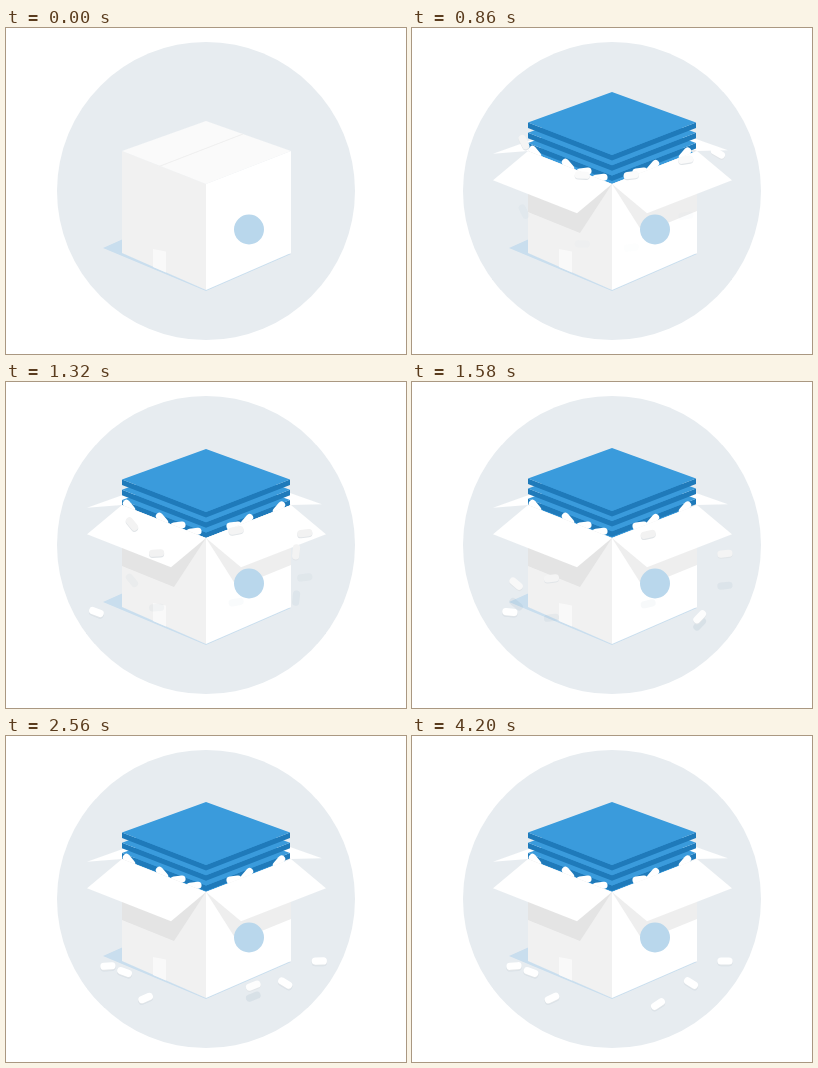
An HTML page that plays this animation: 400 px wide and 326 px high, repeating every 5400 ms.

```html
<!DOCTYPE html>
<html lang="en">
<head>
<meta charset="utf-8">
<title>Unboxing</title>
<style>
html, body { margin: 0; width: 100%; height: 100%; overflow: hidden; background: #fff; }
svg { display: block; width: 100vw; height: 100vh; }
.foam line { stroke-width: 7.2; stroke-linecap: round; }
</style>
</head>
<body>
<svg viewBox="0 0 400 326">
  <circle cx="200" cy="163" r="149" fill="#e7ecf0"/>
  <path d="M97 220 116 211.5 285 226 200 263Z" fill="#c9deee"/>
  <g id="back"></g>
  <path id="inside" d="M116 123 200 93 285 123 200 156Z" fill="#e9e9e9"/>
  <g id="sheets"></g>
  <g id="rim" class="foam"></g>
  <path d="M116 123 200 156V262L116 225Z" fill="#f1f1f1"/>
  <path d="M200 156 285 123V225L200 262Z" fill="#fff"/>
  <path d="M147 221 160 223.5V244.5L147 239Z" fill="#f9f9f9"/>
  <path id="shadeL" fill="#e4e4e4"/>
  <path id="shadeR" fill="#eee"/>
  <circle cx="243" cy="201.5" r="15" fill="#b9d7ec"/>
  <g id="lid">
    <path d="M116 123 200 93 285 123 200 156Z" fill="#fafafa"/>
    <path d="M153 138.5 237 106" stroke="#f0f0f0" stroke-width="1.2"/>
  </g>
  <g id="front"></g>
  <g id="loose" class="foam"></g>
</svg>
<script>
const LOOP = 5400, OPEN = 600;
const L = [116, 123], B = [200, 93], R = [285, 123], F = [200, 156];
const $ = id => document.getElementById(id);

function set(el, attrs) {
  for (const k in attrs) el.setAttribute(k, attrs[k]);
  return el;
}
function add(parent, tag, attrs) {
  const el = document.createElementNS('http://www.w3.org/2000/svg', tag);
  return parent.appendChild(set(el, attrs));
}
const poly = pts => 'M' + pts.map(p => p[0].toFixed(2) + ' ' + p[1].toFixed(2)).join('L') + 'Z';
const show = (el, on) => set(el, { visibility: on ? 'visible' : 'hidden' });
const foam = (parent, attrs) => add($(parent), 'line', { x1: -4, x2: 4, stroke: '#fff', ...attrs });
const place = (el, x, y, a) =>
  set(el, { transform: `translate(${x.toFixed(2)} ${y.toFixed(2)}) rotate(${a.toFixed(1)})` });

// Flaps turn around a hinge a-b; (cx, cy) points inwards when closed.
function makeFlap(group, a, b, cx, cy, end, lag) {
  return { a, b, cx, cy, end, lag, el: add($(group), 'path', { fill: '#fff' }) };
}
const flaps = [
  makeFlap('back', L, B, 37, 14, 199, 15),
  makeFlap('back', R, B, -32, 14, 195, 10),
  makeFlap('front', L, F, 37, -14, 199, 30),
  makeFlap('front', F, R, -37, -14, 199, 0)
];

function drawFlap(f, u) {
  const s = Math.max(0, u - f.lag);
  const open = 1 - Math.exp(-s / 30) * Math.cos(s / 35);
  const th = f.end * open * Math.PI / 180;
  const dx = f.cx * Math.cos(th), dy = f.cy * Math.cos(th) - 49 * Math.sin(th);
  const move = p => [p[0] + dx, p[1] + dy];
  set(f.el, { d: poly([f.a, f.b, move(f.b), move(f.a)]) });
}

// Stack of sheets, lowest first
for (let i = 3; i >= 0; i--) {
  const g = add($('sheets'), 'g', { transform: `translate(0 ${i * 10.2})` });
  add(g, 'path', { d: 'M116 96.5 200 129 284 96.5V102L200 134.5 116 102Z', fill: '#1f7aba' });
  add(g, 'path', { d: 'M116 96.5 200 66 284 96.5 200 129Z', fill: '#3a9bdc' });
}

// Foam caught on the rim: steep far from the front corner, flat near it
for (const x of [123, 156, 172, 188, 228, 241, 273]) {
  const d = Math.abs(x - 200);
  place(foam('rim'), x, 154.5 - 0.39 * d, d > 35 ? 50 * Math.sign(200 - x) : -8);
}

// Loose foam falls from one [time, x, y, angle] to another; hang delays the drop.
function makePiece(from, to, hang = 2) {
  return {
    from, to, hang,
    shade: foam('loose', { stroke: '#5a82a5' }),
    edge: foam('loose', { stroke: '#e1e5e8' }),
    el: foam('loose')
  };
}
const pieces = [
  makePiece([680, 133, 101, 80], [1250, 102, 230, -4]),
  makePiece([1100, 152, 126, 60], [1680, 119, 236, 20]),
  makePiece([680, 178, 145, 5], [2040, 140, 262, -25]),
  makePiece([680, 215, 147, -5], [2640, 246, 268, -33], 4),
  makePiece([860, 306, 125, 30], [1620, 279, 247, 212]),
  makePiece([680, 264, 130, -10], [2040, 313, 225, 0])
];

function drawPiece(p, t) {
  const [t0, x0, y0, a0] = p.from, [t1, x1, y1, a1] = p.to;
  const parts = [p.shade, p.edge, p.el], pop = (t0 - t) / 80;
  for (const el of parts) show(el, pop < 0.7);
  if (pop >= 0.7) return;

  const s = Math.min(1, Math.max(0, (t - t0) / (t1 - t0)));
  const settle = t > t1 ? 1 - Math.exp((t1 - t) / 250) : 0;
  // Quick falls skid back towards the box.
  const skid = 5e6 / (t1 - t0) ** 2 * Math.sign(200 - x1);
  const x = x0 + (x1 - skid - x0) * Math.min(1, s / 0.7) + skid * settle;
  const y = y0 + (y1 - y0) * s ** p.hang + 30 * Math.max(0, pop) ** 2;
  const a = a0 + (a1 - a0) * (0.6 * s + 0.4 * settle);
  const grey = Math.round(255 - 13 * Math.sin(Math.PI * s));

  place(set(p.el, { stroke: `rgb(${grey},${grey},${grey})` }), x, y, a);
  place(p.edge, x, y + 1.1, a);
  place(set(p.shade, { 'stroke-opacity': 0.11 * s }), x, y + Math.max(1.6, 0.6 * (y1 - y)), a);
}

function draw(t) {
  const u = t - OPEN, open = u >= 0;
  show($('lid'), !open);
  for (const id of ['back', 'front', 'sheets', 'shadeL', 'shadeR', 'inside']) show($(id), open);
  show($('rim'), u >= 40);
  for (const p of pieces) drawPiece(p, t);
  if (!open) return;

  for (const f of flaps) drawFlap(f, u);
  const rise = 34 * Math.exp(-u / 207) * Math.cos(u * 0.0173);
  set($('sheets'), { transform: `translate(0 ${rise.toFixed(2)})` });

  const up = 45 * Math.exp(-u / 43);
  set($('shadeL'), { d: poly([L, F, [168, 205 - up], [116, 184 - up]]) });
  set($('shadeR'), { d: poly([F, R, [285, 183 - up], [231, 205 - up]]) });
}

const start = performance.now();
function tick() {
  draw((performance.now() - start) % LOOP);
  requestAnimationFrame(tick);
}
tick();
</script>
</body>
</html>
```
